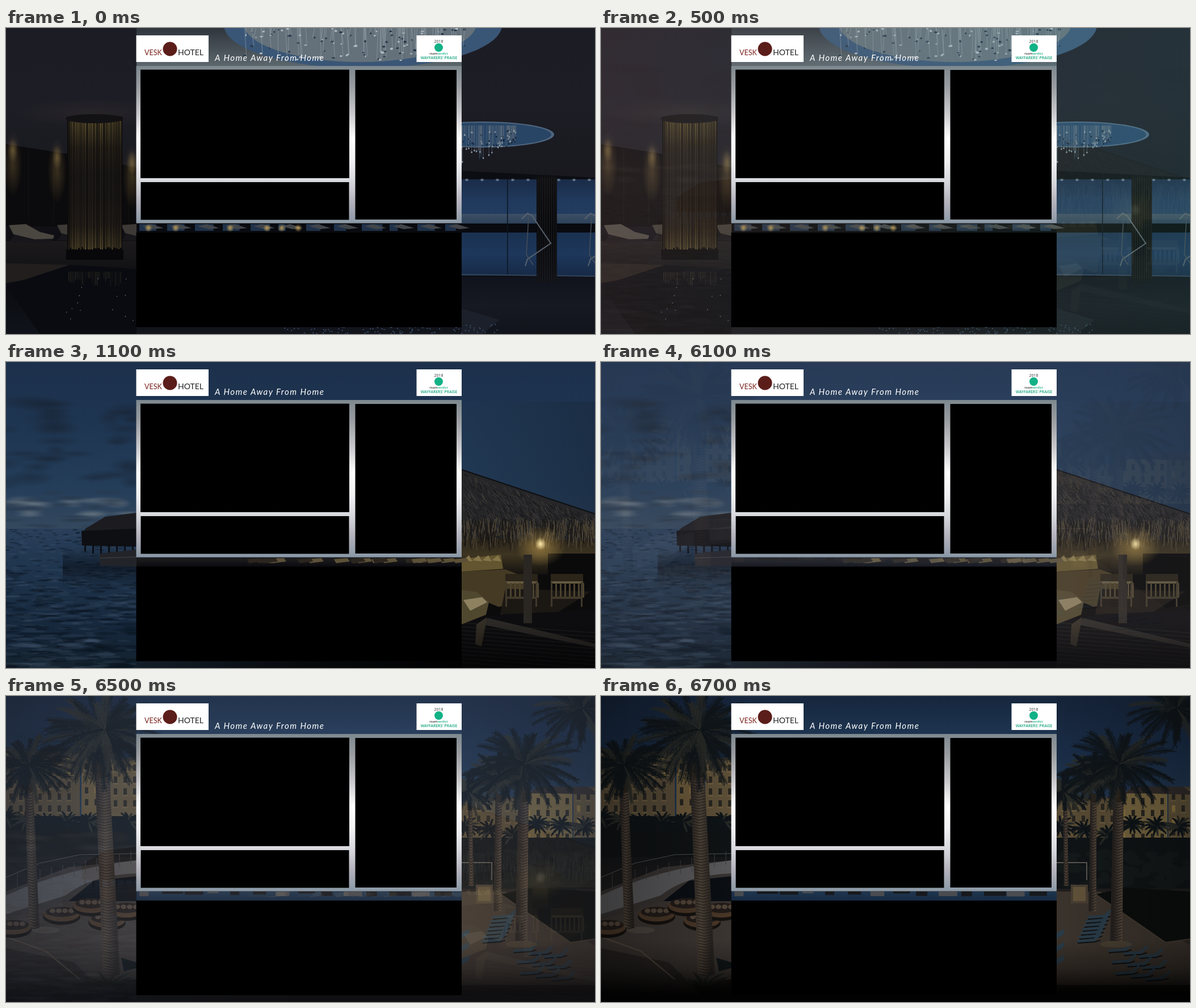
These frames come from a looping animation (1038x540 px, 8000 ms). An HTML page with a canvas:

```html
<!DOCTYPE html>
<html lang="en">
<head>
<meta charset="utf-8">
<title>A Home Away From Home</title>
<style>
html, body { margin: 0; width: 100%; height: 100%; overflow: hidden; background: #000; }
canvas, svg { position: absolute; left: 0; top: 0; width: 1038px; height: 540px; }
</style>
</head>
<body>
<canvas id="stage" width="1038" height="540"></canvas>
<svg viewBox="0 0 1038 540">
  <defs>
    <linearGradient id="steel" x1="0" y1="0" x2="0" y2="1">
      <stop offset="0" stop-color="#7d898f"/>
      <stop offset=".13" stop-color="#999ca0"/>
      <stop offset=".3" stop-color="#c9c9cc"/>
      <stop offset=".46" stop-color="#fff"/>
      <stop offset=".6" stop-color="#f2f2f4"/>
      <stop offset=".74" stop-color="#d6d7dc"/>
      <stop offset=".87" stop-color="#b2b1bb"/>
      <stop offset="1" stop-color="#8a98a5"/>
    </linearGradient>
  </defs>
  <path fill="#fff" d="M229.500 13h127.500v47h-127.500zM723.500 13h79.500v47h-79.500z"/>
  <rect x="229.500" y="67" width="573.500" height="277.500" fill="url(#steel)"/>
  <path d="M237 73.500h368v191.500h-368zM237.500 272h367v66.500h-367zM615.500 74h178.500v264h-178.500zM229.500 361h573.500v167h-573.500z"/>
  <g font-family="Lato, sans-serif">
    <circle cx="289" cy="37" r="12.500" fill="#5b1d19"/>
    <text x="244" y="47.500" font-size="12.500" fill="#7a201b">VESK</text>
    <text x="303" y="47.500" font-size="14" fill="#222">HOTEL</text>
    <text x="368" y="58" font-size="15" font-style="italic" letter-spacing="1.450" fill="#fff">A Home Away From Home</text>
  </g>
  <g font-family="Open Sans, sans-serif" text-anchor="middle">
    <text x="762.500" y="26" font-size="7" fill="#333">2018</text>
    <circle cx="762.500" cy="34.500" r="7.500" fill="#12b186"/>
    <text x="762.500" y="47" font-size="5.500" font-weight="600" fill="#333">roam<tspan fill="#12b186">verdict</tspan></text>
    <text x="763" y="54.500" font-size="6.800" font-weight="600" fill="#12a47c">WAYFARERS' PRAISE</text>
  </g>
</svg>
<script>
const W = 1038, H = 540;
const stage = document.getElementById('stage').getContext('2d');
let g, seed = 7;

function rnd(a = 0, b = 1) {
  seed = (seed * 16807) % 2147483647;
  return a + (b - a) * seed / 2147483647;
}
function scene(draw) {
  const c = document.createElement('canvas');
  c.width = W; c.height = H;
  g = c.getContext('2d');
  draw();
  return c;
}
function ramp(x1, y1, x2, y2, colors) {
  const r = g.createLinearGradient(x1, y1, x2, y2);
  colors.forEach((c, i) => r.addColorStop(i / (colors.length - 1), c));
  return r;
}
function rect(color, x, y, w, h) { g.fillStyle = color; g.fillRect(x, y, w, h); }
function shade(x, y, w, h, ...colors) { rect(ramp(x, y, x, y + h, colors), x, y, w, h); }
function trace(p) {
  g.beginPath();
  for (let i = 0; i < p.length; i += 2) g.lineTo(p[i], p[i + 1]);
}
function poly(color, ...p) { g.fillStyle = color; trace(p); g.fill(); }
function line(color, width, ...p) { g.strokeStyle = color; g.lineWidth = width; trace(p); g.stroke(); }
function oval(color, x, y, rx, ry) {
  g.fillStyle = color;
  g.beginPath(); g.ellipse(x, y, rx, ry, 0, 0, 7); g.fill();
}
function glow(rgb, alpha, x, y, rx, ry) {
  g.save();
  g.translate(x, y); g.scale(rx, ry);
  const r = g.createRadialGradient(0, 0, 0, 0, 0, 1);
  r.addColorStop(0, `rgba(${rgb},${alpha})`);
  r.addColorStop(1, `rgba(${rgb},0)`);
  rect(r, -1, -1, 2, 2);
  g.restore();
}
function times(n, f) { for (let i = 0; i < n; i++) f(i); }

function chaise(x, y, s, color) {
  g.save();
  g.translate(x, y); g.scale(s, s);
  poly(color, 0, 2, 30, 0, 55, 14, 80, 20, 78, 26, 45, 27, 8, 18);
  poly('#17161a', 10, 19, 45, 28, 78, 26, 70, 34, 0, 32);
  g.restore();
}

// Spa hall with glass-strand columns
function spa() {
  shade(0, 0, W, H, '#1c1c25', '#1d1d25', '#18181e', '#0b0b10', '#13151d');
  glow('60,52,48', .35, 150, 150, 140, 25);
  poly('#0b0a0c', 0, 205, 108, 222, 230, 246, 230, 350, 0, 350);
  times(5, i => line('#17140f', 1, 40 + i * 44, 212 + i * 8, 40 + i * 44, 345));
  for (const [x, y] of [[12, 240], [90, 252], [222, 262]]) {
    glow('165,138,80', .5, x, y - 24, 9, 22);
    glow('140,115,65', .35, x, y, 17, 58);
  }
  shade(0, 376, 230, 164, '#1c1a1b', '#0b0c11', '#10131b');
  poly('#211e1d', 0, 415, 112, 418, 60, 440, 0, 450);
  poly('#090b10', 112, 418, 230, 425, 230, 540, 60, 540, 0, 455);
  chaise(5, 346, 1, '#4a4640');
  chaise(90, 346, .9, '#3d3a36');
  chaise(203, 346, .9, '#3d3a36');

  rect('#0c0b0b', 108, 156, 97, 250);
  const strand = ramp(0, 165, 0, 395, ['#8c7742', '#3e3423', '#292320', '#2b2520', '#3a3023', '#85713f']);
  times(32, i => { g.globalAlpha = rnd(.3, 1); rect(strand, 110 + i * 2.95, 164, 1.5, rnd(222, 230)); });
  times(32, i => { g.globalAlpha = rnd(.05, .25); rect('#8b7a55', 110 + i * 2.95, 430, 1.4, rnd(8, 26)); });
  g.globalAlpha = 1;
  oval('#121113', 156, 160, 51, 8);
  rect('#08080a', 106, 391, 101, 18);
  times(14, () => oval('#7a8088', rnd(100, 225), rnd(440, 520), .8, .8));

  shade(230, 0, 573, 67, '#30353c', '#5b666d');
  oval('#3a5676', 629, -5, 245, 76);
  oval('#64717a', 624, -8, 205, 68);
  times(110, () => {
    const x = rnd(420, 810), y = rnd(0, 58);
    line('#98a3ab', .6, x, 0, x + rnd(-4, 4), y);
    oval(rnd() < .5 ? '#28384b' : '#b0b9bf', x, y, rnd(1, 3), rnd(1, 2));
  });
  oval('#4e667f', 840, 188, 126, 23);
  oval('#284566', 838, 188, 123, 21);
  times(85, () => {
    const x = rnd(800, 900), y = 178 + rnd(5, 72) * (1 - (x - 800) / 150);
    line('#66717d', .6, x, 172, x, y);
    oval(rnd() < .5 ? '#8995a0' : '#17253a', x, y, 1.3, 1.7);
  });

  poly('#0c0d13', 803, 252, W, 264, W, 270, 803, 267);
  shade(803, 267, 235, 72, '#1a2c48', '#20395c', '#233e62');
  shade(803, 328, 235, 18, '#3d4f66', '#2c4059');
  rect('#080a0f', 230, 345, 808, 16);
  shade(803, 361, 235, 76, '#1a3150', '#1d375b', '#172a46');
  for (const x of [883, 968]) rect('#0c1421', x, 266, 1.5, 172);
  times(9, i => glow('180,200,220', .7, 812 + i * 27, 268, 4, 3));
  line('#34445a', 2, 803, 435, W, 438);
  shade(803, 439, 235, 101, '#10131c', '#161922', '#12141c');
  poly('#1c202a', 803, 495, 870, 515, 840, 540, 803, 540);
  shade(935, 261, 36, 188, '#101013', '#08090c', '#101116');
  times(9, i => rect('#1d1c1f', 937 + i * 4, 264, 1, 184));
  for (const x of [905, 1016]) {
    line('#59626d', 2, x + 4, 337, x + 14, 327, x + 22, 331, x + 55, 380, x + 14, 408, x + 10, 420);
    line('#454e59', 1.5, x + 16, 333, x + 12, 400, x + 24, 418);
  }
  times(12, i => {
    rect('#1f3149', 235 + i * 49, 346, rnd(10, 38), 12);
    poly('#414549', 240 + i * 49, 350, 255 + i * 49, 346, 278 + i * 49, 353, 260 + i * 49, 355);
  });
  for (const x of [251, 299, 395, 460, 486, 515]) glow('220,180,95', .8, x, 353, 7, 7);
  times(100, () => oval('#3b526b', rnd(490, 870), rnd(522, 540), 1.2, 1));
}

// Thatched huts by the sea at dusk
function beach() {
  shade(0, 0, W, 296, '#1c304b', '#1d334f', '#203854', '#243d59', '#35495e');
  rect(ramp(803, 0, W, 0, ['rgba(32,54,80,.6)', 'rgba(26,44,66,.8)']), 803, 70, 235, 226);
  times(32, () => glow('24,35,50', .5, rnd(-20, 230), rnd(70, 215), rnd(20, 60), rnd(6, 16)));
  times(24, () => glow('122,132,140', .35, rnd(0, 230), rnd(242, 276), rnd(18, 45), rnd(4, 11)));
  times(22, () => glow('40,56,74', .7, rnd(0, 230), rnd(225, 292), rnd(18, 45), rnd(3, 7)));
  shade(0, 294, W, 246, '#293f5a', '#20364f', '#1a2e44', '#15263a', '#15232f');
  times(700, () => {
    const y = 296 + 244 * rnd() ** 1.3, w = 3 + (y - 290) * rnd(.02, .11);
    oval(rnd() < .55 ? 'rgba(8,16,26,.32)' : 'rgba(70,92,115,.2)', rnd(-10, 235), y, w, .7 + w * .09);
  });
  shade(100, 325, 130, 75, 'rgba(8,14,22,0)', 'rgba(8,14,22,.6)', 'rgba(8,14,22,0)');
  poly('#1c1c20', 140, 294, 175, 273, 230, 266, 230, 297, 136, 300);
  poly('#0e0f13', 133, 298, 230, 294, 230, 326, 134, 324);
  times(7, i => rect('#0c0e14', 138 + i * 14, 322, 3, 12 + i * 4));
  poly('#22242a', 165, 338, 230, 331, 230, 361, 166, 360);
  line('#3a3a3c', 1.5, 165, 346, 230, 344);

  poly('#0c0b0c', 803, 275, W, 300, W, 540, 803, 540);
  shade(803, 305, 235, 70, '#241f18', '#3d3421', '#14120f');
  poly('#262628', 803, 190, W, 268, W, 315, 803, 310);
  times(700, () => {
    const x = rnd(803, W), y = rnd(194 + (x - 803) * .335, 304);
    line(rnd() < .5 ? '#413d38' : '#161719', 1, x, y, x + rnd(2, 8), y + rnd(4, 10));
  });
  times(330, () => {
    const x = rnd(803, W), y = rnd(274, 304);
    line(rnd() < .5 ? '#4d4434' : '#1b1815', 1.2, x, y, x + rnd(-5, 4), y + rnd(12, 34));
  });
  line('#0d0f13', 2, 803, 190, W, 268);
  rect('#0a0a0b', 955, 338, 83, 60);
  glow('255,205,100', .45, 942, 325, 45, 36);
  glow('255,235,170', 1, 942, 321, 10, 11);
  poly('#62552f', 803, 347, 872, 340, 876, 365, 803, 370);
  times(4, i => poly('#85764a', 805 + i * 17, 350, 816 + i * 17, 341, 822 + i * 17, 352));
  poly('#453a24', 803, 370, 880, 366, 930, 385, 915, 425, 868, 432, 803, 405);
  poly('#1b1814', 880, 400, 1030, 405, 960, 450, 870, 450);
  poly('#0d0d10', 803, 458, 880, 445, W, 438, W, 540, 803, 540);
  times(14, i => line('#191817', 2, 803, 460 + i * 7, W, 478 + i * 7));
  poly('#2b2926', 850, 452, W, 497, W, 504, 838, 463);
  for (const x of [880, 960]) {
    rect('#2a2419', x, 374, 57, 14);
    rect('#655a40', x, 387, 57, 4);
    times(8, i => rect('#4c432f', x + i * 8, 390, 3, 26));
    rect('#40382a', x + 2, 414, 54, 4);
    for (const d of [0, 53]) rect('#40382a', x + d, 388, 3, 44);
  }
  rect('#2a2723', 912, 340, 15, 121);
  poly('#50472f', 803, 402, 830, 406, 851, 424, 846, 446, 803, 463);
  poly('#8d8160', 806, 420, 839, 415, 848, 424, 818, 439);
  poly('#332e25', 829, 463, 848, 450, 838, 502, 827, 498);
  shade(803, 460, 235, 80, 'rgba(0,0,0,0)', 'rgba(0,0,0,.65)');

  shade(230, 345, 573, 16, '#1f1e20', '#0b0b0f');
  times(26, () => {
    const x = rnd(370, 790);
    poly(rnd() < .4 ? '#5c5138' : '#2a251e', x, 348, x + 24, 346, x + 28, 352, x + 4, 355);
  });
  rect(ramp(230, 0, 803, 0, ['#131e29', '#07090c', '#020203']), 230, 528, 573, 12);
}

function palm(x, y, r, fronds) {
  times(fronds, i => {
    const a = i / fronds * Math.PI * 2 + rnd(-.15, .15), len = r * rnd(.75, 1.1);
    const dx = Math.cos(a), dy = Math.sin(a);
    let px = x, py = y;
    const color = rnd() < .25 ? '#2a2c28' : '#10161a';
    for (let t = .06; t <= 1; t += .035) {
      const qx = x + dx * len * t, qy = y + dy * len * .72 * t + r * .3 * (t * t - t * .75);
      const n = r * .15 * (1.1 - t * .7) * rnd(.7, 1.2);
      line(color, 1.8, px, py, qx, qy);
      line(color, 1, qx + (dx - dy * .6) * n, qy + (dy + dx * .6) * n + n * .3, qx, qy,
        qx + (dx + dy * .6) * n, qy + (dy - dx * .6) * n + n * .3);
      px = qx; py = qy;
    }
  });
}
function trunk(x1, y1, x2, y2, w) {
  poly(ramp(x1 - w / 2, 0, x1 + w, 0, ['#262220', '#51453a', '#2b2622']),
    x1 - w / 2, y1, x1 + w / 2, y1, x2 + w * .6, y2, x2 - w * .6, y2);
  for (let y = y1; y < y2; y += 5) {
    const x = x1 + (x2 - x1) * (y - y1) / (y2 - y1);
    line('#211d1b', 1.2, x - w / 2, y, x, y + 3, x + w / 2, y);
  }
  oval('#2a241d', x1, y1, w * .7, w * .8);
}
function block(x, y, w, h, color) {
  rect(color, x, y, w, h);
  rect('#453d32', x - 2, y - 3, w + 4, 4);
  for (let j = y + 9; j < y + h - 9; j += 21)
    for (let i = x + 6; i < x + w - 5; i += 17) {
      rect(rnd() < .15 ? '#8a7340' : '#2a2721', i, j, 6, 11);
      rect('#6d5d40', i - 2, j + 12, 10, 2);
    }
}

// Resort garden with palms
function garden() {
  shade(0, 0, W, 290, '#16243a', '#1a2d47', '#243850', '#2c3848');
  shade(0, 260, W, 280, '#121417', '#1c1b1c', '#302a27', '#28231f', '#100e0d');
  block(0, 100, 130, 112, '#5a4d39');
  block(133, 89, 50, 122, '#6c5a3b');
  block(184, 112, 50, 100, '#5f5139');
  block(790, 181, 120, 82, '#5a4d36');
  block(912, 171, 86, 95, '#776640');
  block(1000, 163, 40, 105, '#5d5038');
  poly('#302b2a', 925, 171, 935, 160, 1025, 160, W, 168, W, 174);
  rect('#101315', 0, 212, 230, 72);
  rect('#101416', 803, 250, 235, 90);
  times(13, i => palm(i < 7 ? i * 36 : 810 + (i - 7) * 42, i < 7 ? 220 + rnd(-8, 10) : 232 + rnd(-8, 12), 26, 14));
  times(60, () => oval('#14191a', rnd(803, W), rnd(278, 335), rnd(6, 18), rnd(4, 10)));

  poly('#383432', 0, 345, 110, 302, 230, 290, 230, 500, 0, 500);
  g.fillStyle = '#5b5a5c';
  g.beginPath(); g.moveTo(0, 352); g.quadraticCurveTo(100, 305, 230, 290);
  g.lineTo(230, 313); g.quadraticCurveTo(150, 316, 105, 352); g.lineTo(0, 385); g.fill();
  line('#4f4f52', 1.2, 0, 320, 60, 295, 130, 280, 230, 278);
  times(12, i => line('#414145', 1, i * 20, 318 - i * 4, i * 20, 342 - i * 4));
  poly('#0b0f14', 110, 362, 155, 326, 230, 318, 230, 362);
  poly('#3d3733', 0, 395, 110, 362, 230, 366, 230, 500, 120, 510, 0, 470);
  poly('#2b2624', 0, 445, 120, 470, 190, 540, 0, 540);
  line('#574c40', 2.5, 0, 425, 70, 450, 130, 500);
  for (const [x, y] of [[98, 385], [178, 396], [12, 408], [150, 370], [212, 378]]) {
    oval('#15120f', x, y + 4, 33, 15);
    oval('#4b3828', x, y, 32, 13);
    oval('#221c19', x, y - 4, 28, 9);
    times(4, i => oval('#54463a', x - 16 + i * 11, y - 6, 5, 4));
  }
  oval('#4c463f', 70, 413, 25, 6);
  poly('#101719', 203, 462, 230, 470, 230, 480, 208, 486);

  poly('#3c342d', 803, 345, 880, 345, W, 440, W, 510, 803, 510);
  poly('#0b0e0d', 872, 350, 925, 338, W, 345, W, 428, 995, 435);
  line('#443b30', 2, 872, 350, 995, 435, W, 429);
  rect('#4a3f33', 828, 333, 30, 33);
  rect('#63543b', 832, 337, 22, 25);
  line('#5c5852', 2, 803, 294, 856, 294, 856, 325);
  times(16, i => {
    const back = i < 7, k = back ? i : i - 7;
    const x = back ? 878 - k * 3 : 915 + (k % 3) * 27 + (k / 3 | 0) * 6;
    const y = back ? 385 + k * 7 : 444 + (k / 3 | 0) * 20 + (k % 3) * 5;
    poly('#2a3d4a', x - 22, y + 4, x + 8, y + 1, x + 20, y - 9, x + 23, y - 7, x + 10, y + 6, x - 20, y + 8);
    line('#0d1114', 2, x - 20, y + 9, x + 10, y + 7, x + 20, y + 4);
  });
  times(3, i => poly('#2a3d4a', 803, 418 + i * 23, 817, 411 + i * 23, 815, 421 + i * 23, 803, 428 + i * 23));

  trunk(40, 158, 50, 410, 15);
  palm(40, 122, 80, 32);
  trunk(169, 126, 186, 492, 25);
  palm(166, 72, 112, 40);
  trunk(818, 195, 820, 335, 7);
  palm(815, 170, 50, 24);
  trunk(868, 180, 866, 380, 11);
  palm(867, 140, 62, 28);
  trunk(912, 174, 908, 435, 18);
  palm(914, 120, 96, 36);
  palm(1015, 22, 85, 26);
  oval('#4a4032', 908, 438, 28, 6);
  times(25, () => line('#20251d', 2, 180, 510, 180 + rnd(-35, 45), rnd(485, 510)));

  shade(230, 0, 573, 67, '#16263d', '#1d3450');
  palm(175, 60, 100, 16);
  shade(230, 345, 573, 16, '#1f364f', '#172b43');
  times(14, i => rect(i % 3 ? '#17191d' : '#4a4c50', 235 + i * 40, 345, rnd(12, 40), rnd(3, 9)));
  rect(ramp(0, 0, W, 0, ['rgba(0,0,0,.35)', 'rgba(0,0,0,0)', 'rgba(0,0,0,0)', 'rgba(0,0,0,0)', 'rgba(0,0,0,.25)']), 0, 0, W, H);
  shade(0, 430, W, 98, 'rgba(0,0,0,0)', 'rgba(0,0,0,.3)', 'rgba(0,0,0,.95)');
  rect('#020203', 0, 527, W, 13);
}

const scenes = [spa, beach, garden].map(scene);
const warmCool = ramp(0, 0, W, 0, ['rgb(22,13,8)', 'rgb(14,15,12)', 'rgb(9,19,15)']);
// [start in ms, scene position]; fractions blend two neighbours
const cues = [[0, 0], [500, .15], [700, .5], [900, .85], [1100, 1], [6100, 1.15], [6300, 1.5], [6500, 1.8], [6700, 2]];

function paint(now) {
  const t = now % 8000;
  const pos = cues.filter(c => c[0] <= t).pop()[1];
  const base = Math.floor(pos), mix = pos - base;
  stage.drawImage(scenes[base], 0, 0);
  if (mix) {
    stage.globalAlpha = mix;
    stage.drawImage(scenes[base + 1], 0, 0);
    stage.globalAlpha = 1;
    stage.globalCompositeOperation = 'lighter';
    stage.fillStyle = base ? 'rgb(13,12,13)' : warmCool;
    stage.fillRect(0, 0, W, H);
    stage.globalCompositeOperation = 'source-over';
  }
  requestAnimationFrame(paint);
}
paint(0);
</script>
</body>
</html>
```
